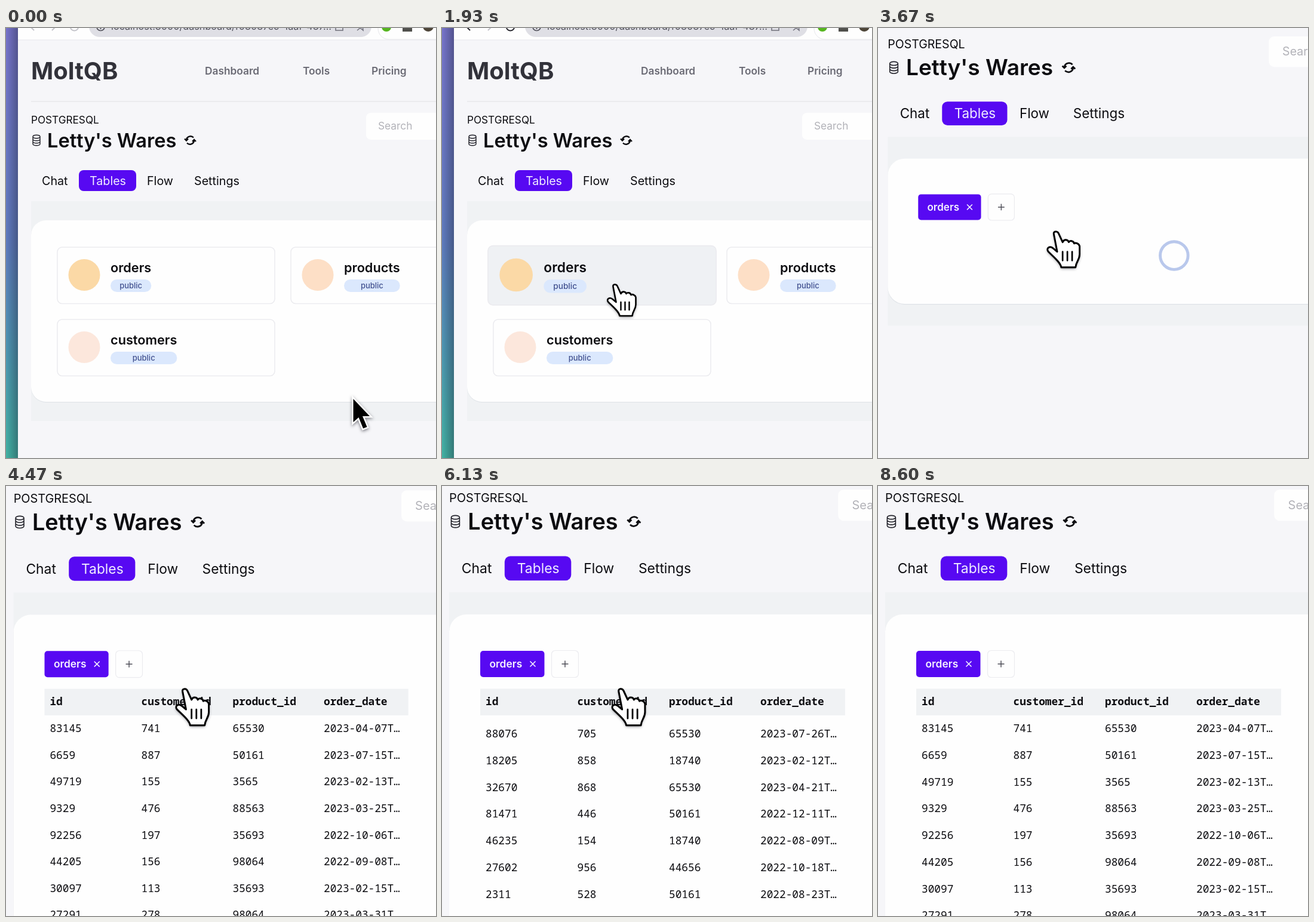
Recreate the animation shown at these times as an HTML page with a canvas. Size 720x720 px, loop 8670 ms.

```html
<!DOCTYPE html>
<html lang="en">
<head>
<meta charset="utf-8">
<title>Table browser demo</title>
<style>
html, body { margin: 0; width: 100%; height: 100%; overflow: hidden; background: #f6f6f9; }
canvas { display: block; width: 100vw; height: 100vh; }
</style>
</head>
<body>
<canvas id="stage" width="720" height="720"></canvas>
<script>
const ctx = document.getElementById('stage').getContext('2d');
const LOOP = 8670, CLICK = 2400, LOADED = 4200;
const ZOOM = 1.161, PAN_X = -36.8, PAN_Y = -158.8;
const ROW = 44.7, ROWS_TOP = 384, SECOND = 14, THIRD = 26;
const INK = '#0c0c10', PAGE = '#f6f6f9', BAND = '#f0f2f4', WHITE = '#fefefe', LINE = '#ebebef', PURPLE = '#5709f2';
const SANS = 'Inter, sans-serif', MONO = '"Noto Sans Mono", monospace';

// Smooth interpolation through [time, value] keys.
function track(t, ...keys) {
  if (t <= keys[0][0]) return keys[0][1];
  for (let i = 1; i < keys.length; i++) {
    const [t0, v0] = keys[i - 1], [t1, v1] = keys[i];
    if (t < t1) {
      const u = (t - t0) / (t1 - t0);
      return v0 + (v1 - v0) * u * u * (3 - 2 * u);
    }
  }
  return keys[keys.length - 1][1];
}

// Critically damped spring from one value to another.
function spring(t, start, rate, from, to) {
  const x = Math.max(0, t - start) * rate / 1000;
  return to + (from - to) * (1 + x) * Math.exp(-x);
}

function text(str, x, y, size, { weight = 400, color = INK, font = SANS, align = 'left' } = {}) {
  ctx.font = `${weight} ${size}px ${font}`;
  ctx.fillStyle = color;
  ctx.textAlign = align;
  ctx.fillText(str, x, y);
}

function box(x, y, w, h, r, fill, stroke, lineWidth = 1.5) {
  ctx.beginPath();
  ctx.roundRect(x, y, w, h, r);
  if (fill) { ctx.fillStyle = fill; ctx.fill(); }
  if (stroke) { ctx.strokeStyle = stroke; ctx.lineWidth = lineWidth; ctx.stroke(); }
}

function disc(x, y, r, fill) {
  ctx.beginPath();
  ctx.arc(x, y, r, 0, 7);
  ctx.fillStyle = fill;
  ctx.fill();
}

function path(d, stroke, width) {
  ctx.strokeStyle = stroke;
  ctx.lineWidth = width;
  ctx.stroke(new Path2D(d));
}

function withState(draw) {
  ctx.save();
  draw();
  ctx.restore();
}

// Table data: three fixed stretches with generated rows between them.
const parse = list => list.split(',').map(row => row.split(' '));
const firstRows = parse('83145 741 65530 2023-04-07,6659 887 50161 2023-07-15,49719 155 3565 2023-02-13,9329 476 88563 2023-03-25,92256 197 35693 2022-10-06,44205 156 98064 2022-09-08,30097 113 35693 2023-02-15,27291 278 98064 2023-03-31');
const middleRows = parse('88076 705 65530 2023-07-26,18205 858 18740 2023-02-12,32670 868 65530 2023-04-21,81471 446 50161 2022-12-11,46235 154 18740 2022-08-09,27602 956 44656 2022-10-18,2311 528 50161 2022-08-23');
const lastRows = parse('11946 721 44656 2022-10-07,27776 252 88563 2023-02-12,85577 293 98064 2023-04-20,11521 383 88563 2023-03-17,44750 198 50161 2022-11-07,84071 562 32919 2023-07-13,93489 804 17968 2023-01-30');
const products = [...new Set([...firstRows, ...middleRows, ...lastRows].map(row => row[2]))];
let seed = 7;
const random = n => (seed = seed * 16807 % 2147483647) % n;
const two = n => String(n).padStart(2, '0');
const rows = Array.from({ length: THIRD + 9 }, () => [
  1000 + random(98000), 100 + random(890), products[random(products.length)],
  `2023-${two(1 + random(7))}-${two(1 + random(28))}`
]);
rows.splice(0, firstRows.length, ...firstRows);
rows.splice(SECOND, middleRows.length, ...middleRows);
rows.splice(THIRD, lastRows.length, ...lastRows);

function drawBrowser(t) {
  const strip = ctx.createLinearGradient(0, 0, 0, 720);
  strip.addColorStop(0, '#7874cc');
  strip.addColorStop(.5, '#5f7cc0');
  strip.addColorStop(.75, '#4e98b4');
  strip.addColorStop(1, '#42b4a4');
  ctx.fillStyle = strip;
  ctx.fillRect(0, 0, 20, 720);
  const shade = ctx.createLinearGradient(0, 0, 20, 0);
  shade.addColorStop(0, 'rgba(30,35,50,0)');
  shade.addColorStop(1, 'rgba(30,35,50,.4)');
  ctx.fillStyle = shade;
  ctx.fillRect(0, 0, 20, 720);

  ctx.fillStyle = WHITE;
  ctx.fillRect(20, -20, 720, 40);
  ctx.fillStyle = '#e8e8ec';
  ctx.fillRect(20, 19.5, 720, 1);
  box(139, -25, 473, 40, 18, '#dfdfe5');
  box(623, -25, 130, 44, 18, WHITE, '#e6e6ea', 1);
  const nav = t < 500 ? '#c4c4ca' : '#22222a';
  path('M47 4L41 -2L47 -8', nav, 2);
  path('M77 4L83 -2L77 -8', '#c4c4ca', 2);
  path('M108 0A7 7 0 0 0 121 0', nav, 2);
  path('M152 -2A6.5 6.5 0 0 0 165 -2M158.5 -3V2', '#50505a', 1.7);
  text('localhost:3000/dashboard/f08087e9-1aaf-487…', 176, 3, 16.2, { color: '#50505a' });
  path('M552 -6V4H564V-6M588 4L593 0L598 4L597 -4', '#73737e', 1.6);
  disc(637, -2, 8, '#55b51e');
  ctx.fillStyle = '#50504c';
  ctx.fillRect(664, -10, 16, 16);
  disc(707, -3, 9, '#4d4538');
}

function drawHeader() {
  text('MoltQB', 42, 86, 40, { weight: 700, color: '#32323a' });
  const link = { weight: 600, color: '#6a6a74' };
  text('Dashboard', 333, 78, 17.3, link);
  text('Tools', 497, 78, 17.3, link);
  text('Pricing', 612, 78, 17.3, link);
  ctx.fillStyle = '#ebebee';
  ctx.fillRect(42, 122, 700, 2);

  text('POSTGRESQL', 42, 160, 17.2);
  path('M45 182A6 2.7 0 0 1 57 182A6 2.7 0 0 1 45 182V194A6 2.7 0 0 0 57 194V182M45 186A6 2.7 0 0 0 57 186M45 190A6 2.7 0 0 0 57 190', '#22222a', 1.4);
  text("Letty's Wares", 69, 199.5, 32.6, { weight: 600 });
  path('M302 187A7 7 0 0 1 314 183.5M315 188.5A7 7 0 0 1 303 192.5M299 185.5L302 188.5L305 185.5M312 190L315 187L318 190', INK, 2.4);
  box(603, 142, 150, 45, 8, WHITE);
  text('Search', 623, 170, 17.3, { color: '#b2b2b8' });

  box(122, 238, 96, 35, 8, PURPLE);
  text('Chat', 60, 262.5, 19.7);
  text('Tables', 140, 262.5, 19.7, { color: '#f0ecff' });
  text('Flow', 236, 262.5, 19.7);
  text('Settings', 315, 262.5, 19.7);
}

function drawPanel(bottom) {
  ctx.fillStyle = BAND;
  ctx.fillRect(42, 290, 720, bottom - 258);
  box(42, 323, 760, bottom - 322, 25, '#dee2e7');
  box(42, 322, 760, bottom - 322, 25, WHITE);
}

function drawCard(name, x, y, color, hover) {
  withState(() => {
    const scale = 1 + .05 * hover;
    ctx.translate(x + 182, y + 47);
    ctx.scale(scale, scale);
    ctx.translate(-182, -47);
    box(0, 0, 364, 94.5, 8, WHITE);
    ctx.globalAlpha = hover;
    box(0, 0, 364, 94.5, 8, '#eff1f4');
    ctx.globalAlpha = 1;
    box(0, 0, 364, 94.5, 8, null, LINE);
    disc(45, 46.5, 26.5, color);
    text(name, 89, 42, 21.7, { weight: 600 });
    const width = ctx.measureText(name).width;
    box(89, 54, width, 21, 10.5, '#dbe8fd');
    text('public', 89 + width / 2, 69, 13, { weight: 500, color: '#41508f', align: 'center' });
  });
}

function drawCards(t) {
  drawPanel(626);
  drawCard('products', 477, 367, '#fddfc6', 0);
  drawCard('customers', 86, 488, '#fce7dc', track(t, [1067, 0], [1217, 1], [1230, 1], [1380, 0]));
  drawCard('orders', 86, 367, '#fbd9a6', track(t, [1340, 0], [1490, 1]));
}

function drawTable(t, cursorY) {
  const columns = [73, 226.5, 380, 533];
  const scroll = track(t, [5276, 0], [6126, SECOND * ROW - 9], [6250, SECOND * ROW - 9],
    [7080, THIRD * ROW - 15], [7200, THIRD * ROW - 15], [8250, 0]);
  // The smoothed pointer trails the hovered row slightly.
  const pointer = cursorY * ZOOM + PAN_Y + 35;
  const hovered = pointer > ROWS_TOP && pointer < 760 ? Math.floor((pointer - ROWS_TOP + scroll) / ROW) : -1;
  withState(() => {
    ctx.beginPath();
    ctx.rect(64, ROWS_TOP, 611, 400);
    ctx.clip();
    rows.forEach((row, i) => {
      const y = ROWS_TOP + i * ROW - scroll;
      if (y < 330 || y > 730) return;
      if (i === hovered) {
        ctx.fillStyle = BAND;
        ctx.fillRect(64, y, 611, ROW);
      }
      row.forEach((cell, c) => text(c === 3 ? cell + 'T…' : cell, columns[c], y + 28.4, 17.8, { font: MONO }));
    });
  });
  ctx.fillStyle = BAND;
  ctx.fillRect(64, 339.5, 611, 44.5);
  ['id', 'customer_id', 'product_id', 'order_date'].forEach((name, c) =>
    text(name, columns[c], 367, 17.8, { weight: 700, font: MONO }));
}

function drawOrders(t, cursorY) {
  const loaded = t >= LOADED;
  drawPanel(loaded ? 900 : 536);
  withState(() => {
    // Laid out at full zoom.
    ctx.scale(1 / ZOOM, 1 / ZOOM);
    ctx.translate(-PAN_X, -PAN_Y);
    box(64, 276, 107.5, 44, 5, PURPLE);
    text('orders', 79.5, 304, 17.4, { weight: 600, color: '#f5f1ff' });
    path('M147.5 293.5L156.5 302.5M156.5 293.5L147.5 302.5', '#f5f1ff', 1.6);
    box(183.5, 275.5, 45, 45, 6, WHITE, LINE, 1.2);
    path('M200.5 298H211.5M206 292.5V303.5', '#50505a', 1.5);
    if (loaded) return drawTable(t, cursorY);
    ctx.beginPath();
    ctx.arc(501.5, 380.8, 23.8, 0, 7);
    ctx.strokeStyle = '#b9c8ec';
    ctx.lineWidth = 5;
    ctx.stroke();
  });
}

const HAND = new Path2D('M-3 2C-4 -2 2 -3 4 1L10 14C12 9 18 10 19 14C21 11 26 12 27 16C29 14 34 16 35 20V32C35 40 30 42 29 51H8C7 44 -3 36 -11 28C-15 23 -9 19 -4 23L2 28Z');
const ARROW = new Path2D('M1.5 4V43L10.5 35L18 53.5L24.5 51L17 33H29Z');

function drawCursor(x, y, hand) {
  withState(() => {
    ctx.translate(x, y);
    ctx.lineJoin = ctx.lineCap = 'round';
    ctx.shadowColor = 'rgba(30,30,40,.55)';
    ctx.shadowBlur = 5;
    ctx.shadowOffsetY = 2;
    ctx.lineWidth = hand ? 2.6 : 5;
    ctx.strokeStyle = hand ? '#000' : '#fff';
    ctx.fillStyle = hand ? '#fff' : '#000';
    if (hand) {
      ctx.fill(HAND);
      ctx.shadowColor = 'transparent';
      ctx.stroke(HAND);
      path('M10 28V41M17 28V41M24 28V41', '#000', 2.4);
    } else {
      ctx.lineJoin = 'miter';
      ctx.stroke(ARROW);
      ctx.shadowColor = 'transparent';
      ctx.fill(ARROW);
    }
  });
}

function draw(t) {
  // The view glides to the table while the zoom settles more slowly.
  const zoom = spring(t, 2500, 2.9, 1, ZOOM);
  const centerX = spring(t, 2500, 3, 360, (360 - PAN_X) / ZOOM);
  const centerY = spring(t, 2500, 6, 360, (360 - PAN_Y) / ZOOM);
  const cursorX = track(t, [600, 580], [1600, 289.5], [6560, 289.5], [7900, 346]);
  const cursorY = track(t, [600, 617], [1600, 431], [6560, 431], [7900, 805]);
  const hand = (t > 1067 && t < 1230) || (t > 1340 && t < 6740);

  ctx.setTransform(1, 0, 0, 1, 0, 0);
  ctx.fillStyle = PAGE;
  ctx.fillRect(0, 0, 720, 720);
  ctx.setTransform(zoom, 0, 0, zoom, 360 - centerX * zoom, 360 - centerY * zoom);
  drawBrowser(t);
  drawHeader();
  if (t < CLICK) drawCards(t);
  else drawOrders(t, cursorY);
  drawCursor(cursorX, cursorY, hand);
}

const start = performance.now();
function frame() {
  draw((performance.now() - start) % LOOP);
  requestAnimationFrame(frame);
}
frame();
</script>
</body>
</html>
```
